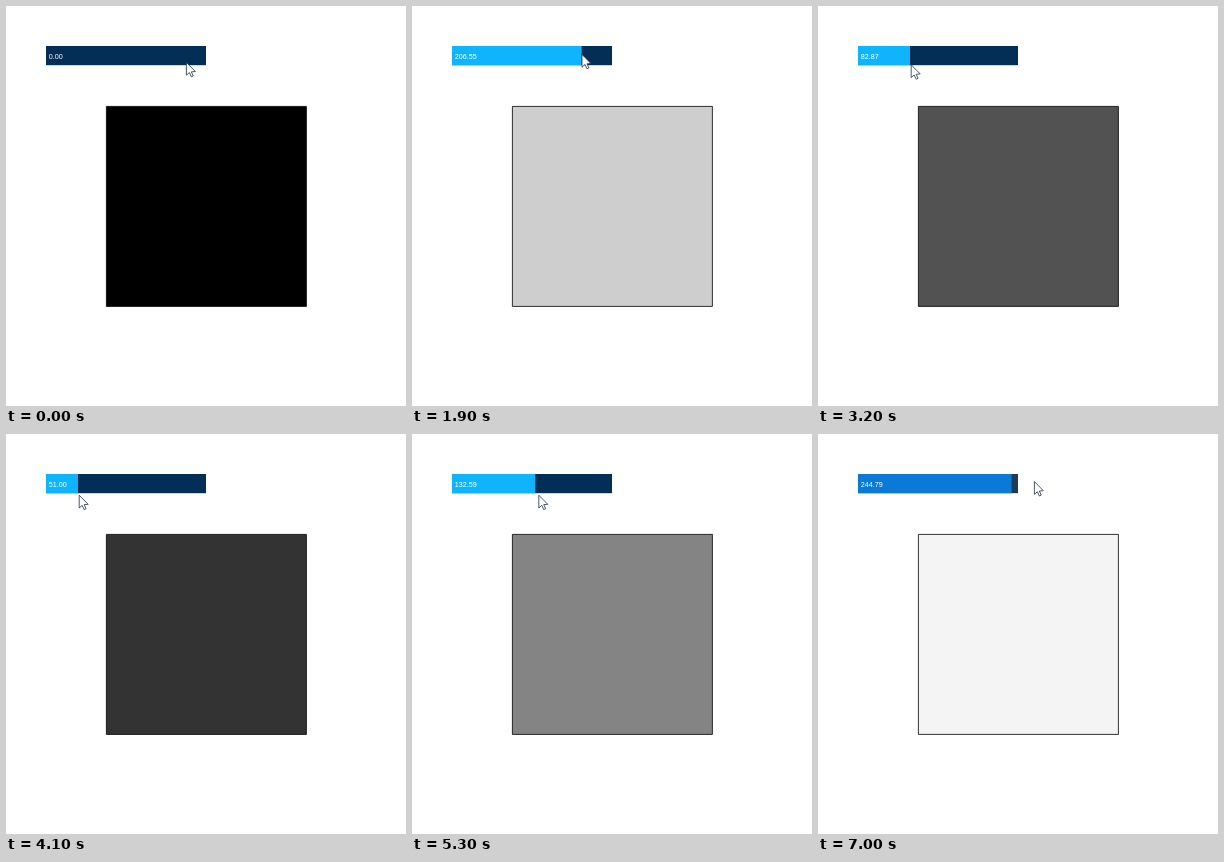
Animation of 400x400 px, one loop 7.1 s. Source, as an HTML page with a canvas:

```html
<!DOCTYPE html>
<html>
<head>
<meta charset="utf-8">
<style>
  html, body { margin: 0; width: 100%; height: 100%; overflow: hidden; background: #fff; }
  canvas { display: block; }
</style>
</head>
<body>
<canvas id="stage" width="400" height="400"></canvas>
<script>
const ctx = document.getElementById('stage').getContext('2d');
// The scene is laid out on a 500 px sketch shown at 80 %.
const SCALE = 0.8, SIZE = 500;
const LOOP = 7100, TICK = 100, PRESS = 100, RELEASE = 7000;
const BAR = { x: 50, y: 50, w: 200, h: 24 };

// Each drag eases the slider to a step; the pointer leads the bar's edge by `lead`.
const rest = { step: 174, lead: 1, y: 70 };
const drags = [
  { start: 100, end: 700, step: 74, lead: 0, y: 60 },
  { start: 1000, end: 1600, step: 163, lead: 0, y: 60 },
  { start: 1800, end: 3800, step: 38, lead: 1, y: 76 },
  { start: 4000, end: 4900, step: 103, lead: 4, y: 76 },
  { start: 5200, end: 6800, step: 192, lead: 9, y: 60 },
  { start: 6900, end: 7000, step: 192, lead: 28, y: 59 }
];

const smooth = k => k * k * (3 - 2 * k);
const mix = (a, b, k) => a + (b - a) * k;

function poseAt(time) {
  let pose = rest;
  for (const drag of drags) {
    if (time < drag.start) break;
    const k = smooth(Math.min(1, (time - drag.start) / (drag.end - drag.start)));
    pose = {
      step: mix(pose.step, drag.step, k),
      lead: mix(pose.lead, drag.lead, k),
      y: mix(pose.y, drag.y, k)
    };
  }
  const step = Math.round(pose.step);
  return { step, x: BAR.x + step + Math.round(pose.lead), y: Math.round(pose.y) };
}

function drawSlider(step, value, released) {
  ctx.fillStyle = released ? '#1f3b57' : '#032e55';
  ctx.fillRect(BAR.x, BAR.y, BAR.w, BAR.h);
  ctx.fillStyle = released ? '#0a7ad6' : '#10b4fc';
  ctx.fillRect(BAR.x, BAR.y, step, BAR.h);
  ctx.fillStyle = '#fff';
  ctx.font = '9px "Liberation Sans", Arial, sans-serif';
  ctx.fillText((Math.floor(value * 100) / 100).toFixed(2), 53.3, 66);
}

function drawSquare(value) {
  const shade = Math.floor(value);
  ctx.beginPath();
  ctx.rect(125.5, 125.5, 250, 250);
  ctx.fillStyle = `rgb(${shade},${shade},${shade})`;
  ctx.fill();
  ctx.strokeStyle = '#000';
  ctx.lineWidth = 1;
  ctx.stroke();
}

function drawPointer(x, y) {
  const outline = [[0, 0], [0, 16], [3.7, 12.7], [6.2, 18], [8.6, 16.9], [6.2, 11.8], [11.2, 11.4]];
  ctx.beginPath();
  outline.forEach(([dx, dy]) => ctx.lineTo(x + 0.5 + dx, y + 0.5 + dy));
  ctx.closePath();
  ctx.fillStyle = '#fff';
  ctx.fill();
  ctx.strokeStyle = '#1c3048';
  ctx.stroke();
}

function draw(now) {
  const time = Math.floor(now % LOOP / TICK) * TICK;
  const { step, x, y } = poseAt(time);
  const shown = time < PRESS ? 0 : step;
  // Single precision gives the slider's truncated two-digit readout.
  const value = Math.fround(Math.fround(shown / BAR.w) * 255);
  ctx.setTransform(SCALE, 0, 0, SCALE, 0, 0);
  ctx.fillStyle = '#fff';
  ctx.fillRect(0, 0, SIZE, SIZE);
  drawSlider(shown, value, time >= RELEASE);
  drawSquare(value);
  drawPointer(x, y);
}

const start = performance.now();
function frame() {
  draw(performance.now() - start);
  requestAnimationFrame(frame);
}
frame();
</script>
</body>
</html>
```
